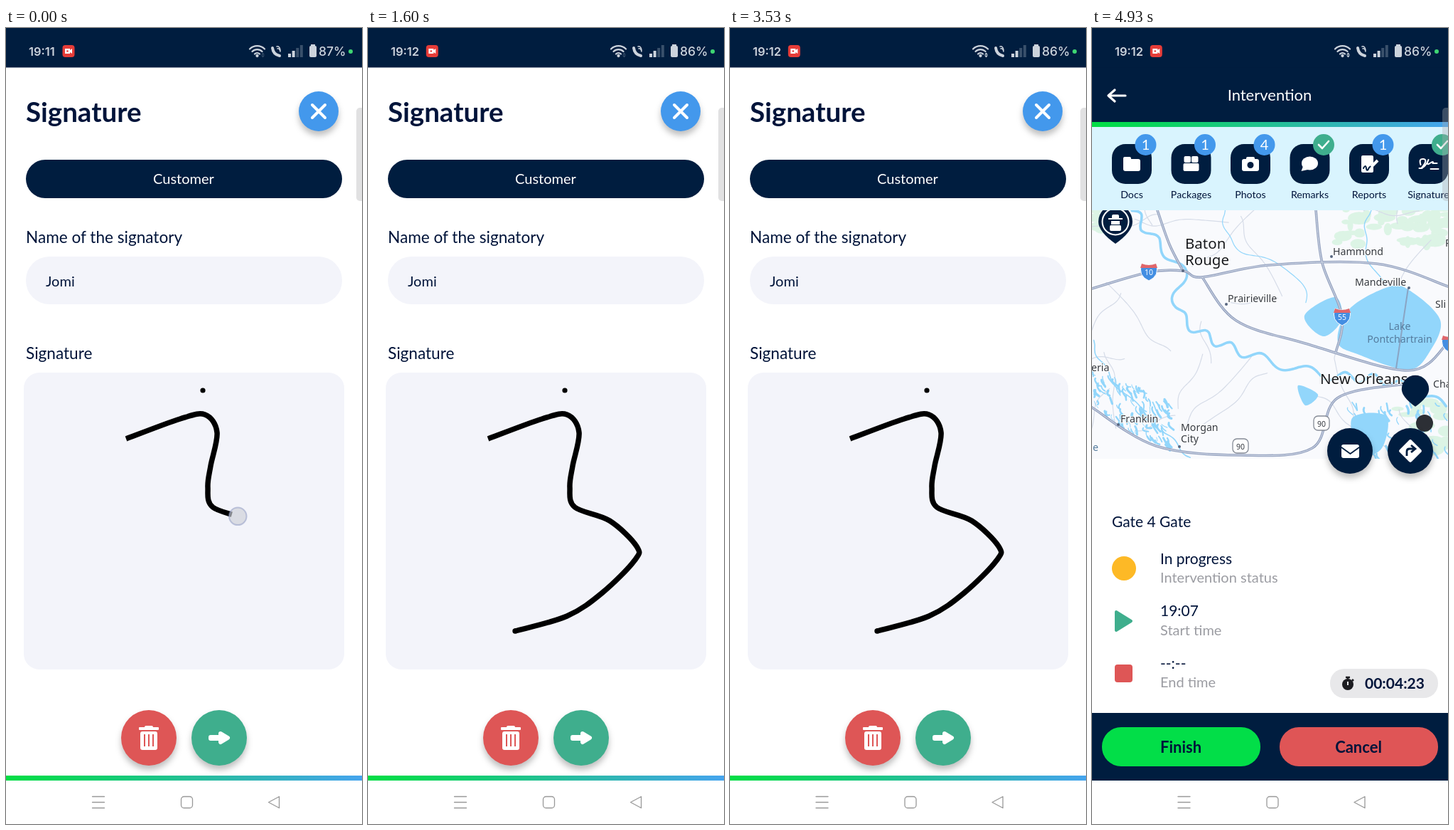
Write an HTML page that moves like this. It is 501 px wide and 1118 px high and loops after 5000 ms.

```html
<!DOCTYPE html>
<html lang="en">
<head>
<meta charset="utf-8">
<title>Sign-off flow</title>
<style>
html, body { margin: 0; width: 100%; height: 100%; overflow: hidden; background: #fff; }
svg { display: block; width: 100%; height: 100%; }
text { font: 20px Lato, "Open Sans", sans-serif; fill: #00143a; }
.mid, .tag, .count, .num, .sea { text-anchor: middle; }
.title { font-size: 38.5px; font-weight: 700; }
.label { font-size: 22.6px; }
.value { font-size: 21px; }
.head { font-size: 22px; }
.bold { font-size: 22px; font-weight: 700; }
.timer { font-size: 21px; font-weight: 700; }
.note { fill: #9b9ca2; }
.white { fill: #fff; }
.tag { font-size: 14.2px; }
.count { font-size: 20px; fill: #fff; }
.status text { font: 500 17.5px Inter, sans-serif; fill: #ccd3dc; }
.status #clock { font-size: 16.5px; font-weight: 600; }
.map text { font: 14.2px "Noto Sans", "Open Sans", sans-serif; fill: #34383f;
  paint-order: stroke; stroke: #fff; stroke-width: 2px; stroke-linejoin: round; }
.map .city { font-size: 20.5px; fill: #17191d; }
.map .sea { fill: #557c9e; stroke: none; }
.map .num { font-size: 10.5px; stroke: none; }
.line { fill: none; stroke-linecap: round; stroke-linejoin: round; }
.lift { filter: drop-shadow(0 6px 4px rgba(0, 0, 0, .25)); }
</style>
</head>
<body>
<svg viewBox="0 0 501 1118" preserveAspectRatio="none">
  <defs>
    <linearGradient id="brand"><stop stop-color="#02dd45"/><stop offset=".12" stop-color="#06d854"/><stop offset=".55" stop-color="#27bd9c"/><stop offset="1" stop-color="#45a4ee"/></linearGradient>
    <clipPath id="mapBox"><rect y="256" width="501" height="349"/></clipPath>
    <g id="interstate">
      <path d="M-10-11Q0-7 10-11Q16 6 0 13Q-16 6-10-11z" fill="#438ee2" stroke="#fff"/>
      <path d="M-10-11Q0-7 10-11L12-5H-12z" fill="#e0666b"/>
    </g>
    <rect id="route" x="-11" y="-10" width="22" height="20" rx="6" fill="#fff" stroke="#858b96" stroke-width="1.3"/>
    <path id="pin" d="M0 31Q-24 14-24 0A24 24 0 0 1 24 0Q24 14 0 31z" fill="#001d3f"/>
  </defs>
  <rect width="501" height="1118" fill="#fff"/>

  <g id="signScreen">
    <text x="28" y="132" class="title">Signature</text>
    <circle class="lift" cx="440" cy="117" r="28" fill="#4398ec"/>
    <path class="line" d="M431 108l18 18m0-18l-18 18" stroke="#fff" stroke-width="4"/>
    <rect x="28" y="185" width="445" height="54" rx="27" fill="#001d3f"/>
    <text x="250" y="219" class="mid white">Customer</text>
    <text x="28" y="302" class="label">Name of the signatory</text>
    <rect x="28" y="321" width="445" height="67" rx="33" fill="#f3f4fa"/>
    <text x="56" y="363">Jomi</text>
    <text x="28" y="465" class="label">Signature</text>
    <rect x="25" y="484" width="451" height="417" rx="22" fill="#f3f4fa"/>
    <circle cx="277" cy="509" r="3.6"/>
    <path id="ink" fill="none" stroke="#000" stroke-width="7.5"/>
    <circle id="inkEnd" cx="207" cy="847" r="3.7"/>
    <circle class="lift" cx="201" cy="997" r="39" fill="#de5656"/>
    <g fill="#fff">
      <rect x="195" y="980" width="12" height="4" rx="2"/>
      <rect x="187" y="982" width="28" height="4" rx="1"/>
      <rect x="189" y="988" width="24" height="26" rx="3"/>
      <path d="M195 992v17m6-17v17m6-17v17" stroke="#de5656" stroke-width="2"/>
    </g>
    <circle class="lift" cx="300" cy="997" r="39" fill="#3fae8d"/>
    <path d="M288 996h14v-5l10 6-10 6v-5h-14z" fill="#fff" stroke="#fff" stroke-width="6" stroke-linejoin="round"/>
    <rect y="1050" width="501" height="7" fill="url(#brand)"/>
  </g>

  <g id="jobScreen">
    <path d="M0 55H501V132H0zM0 962H501V1057H0z" fill="#001d3f"/>
    <path class="line" d="M47 95H23m9-8l-9 8 9 8" stroke="#fff" stroke-width="3.2"/>
    <text x="250" y="102" class="mid white head">Intervention</text>
    <rect y="132" width="501" height="7" fill="url(#brand)"/>
    <rect y="139" width="501" height="117" fill="#d9f4fe"/>
    <g id="tiles"></g>

    <g class="map" clip-path="url(#mapBox)">
      <rect y="256" width="501" height="349" fill="#f9fafd"/>
      <g id="woods" fill="#dcf4e5"></g>
      <g id="lanes" class="line" stroke="#d6dce8" stroke-width="1.2"></g>
      <g id="water" class="line" stroke="#92d6fb"></g>
      <g id="lakes" fill="#92d6fb"></g>
      <g id="roads" class="line"></g>
      <path d="M445 365L428 478" stroke="#8aa5c4" stroke-width="2"/>
      <g id="places"></g>
      <circle cx="468" cy="555" r="12" fill="#2c2f35"/>
      <use href="#pin" transform="translate(455 507) scale(.8)"/>
      <use href="#pin" x="33" y="272"/>
      <circle cx="33" cy="272" r="18.500" fill="none" stroke="#fff" stroke-width="2"/>
      <g fill="#fff">
        <rect x="28" y="262" width="10" height="7" rx="2"/>
        <rect x="23" y="267" width="20" height="2"/>
        <rect x="27" y="271" width="12" height="5"/>
        <rect x="25" y="277" width="16" height="8" rx="2"/>
      </g>
    </g>

    <g class="lift" fill="#001d3f"><circle cx="363" cy="594" r="32"/><circle cx="448" cy="594" r="32"/></g>
    <rect x="351" y="585" width="25" height="19" rx="3" fill="#fff"/>
    <path class="line" d="M351 589l12.500 9 12.500-9" stroke="#001d3f" stroke-width="1.800"/>
    <rect x="436" y="582" width="24" height="24" rx="3" fill="#fff" transform="rotate(45 448 594)"/>
    <path d="M443 601v-6q0-4 4-4h6m-4-5l6 5-6 5" fill="none" stroke="#001d3f" stroke-width="2.800"/>

    <text x="28" y="701" class="value">Gate 4 Gate</text>
    <circle cx="45" cy="759" r="17" fill="#fdb926"/>
    <path d="M34 820l21 13-21 13z" fill="#3fae8d" stroke="#3fae8d" stroke-width="4" stroke-linejoin="round"/>
    <rect x="32" y="894" width="25" height="25" rx="4" fill="#de5656"/>
    <g id="facts"></g>
    <rect x="335" y="900" width="152" height="41" rx="20" fill="#e8e8ea"/>
    <circle cx="360" cy="922" r="8" fill="#1c1c20"/>
    <path d="M357 912h6m-3 0v4m6-1l2 2" stroke="#1c1c20" stroke-width="2.600"/>
    <path d="M360 918v5" stroke="#e8e8ea" stroke-width="2"/>
    <text x="384" y="928" class="timer">00:04:23</text>
    <rect x="14" y="982" width="223" height="55" rx="27" fill="#02de48"/>
    <rect x="264" y="982" width="223" height="55" rx="27" fill="#df5556"/>
    <text x="125" y="1018" class="mid bold">Finish</text>
    <text x="375" y="1018" class="mid bold">Cancel</text>
  </g>

  <rect x="493" y="112" width="14" height="131" rx="5" fill="#a8a8ac" opacity=".35"/>
  <g class="status">
    <rect width="501" height="55.500" fill="#001d3f"/>
    <text id="clock" x="32" y="39"></text>
    <g id="rec">
      <rect x="79.500" y="24" width="17" height="17" rx="4" fill="#e63c38"/>
      <path d="M83 29h7v2l3-2v7l-3-2v2h-7z" fill="#fff"/>
      <circle cx="86.500" cy="32.500" r="1.300" fill="#e63c38"/>
    </g>
    <g id="signals" fill="#ccd3dc">
      <g id="waves" class="line" stroke="#ccd3dc" stroke-width="2.300"></g>
      <path id="up" d="M359 37.500h5l-2.500-3z"/>
      <path id="down" d="M359 38.500h5l-2.500 3z"/>
      <path class="line" d="M375 28Q376 37 385 39" stroke="#ccd3dc" stroke-width="4"/>
      <g id="bars"></g>
      <rect x="427" y="25" width="10" height="16" rx="2"/>
      <rect x="429" y="23" width="6" height="4"/>
      <text id="battery" x="440" y="39"></text>
    </g>
    <circle cx="485" cy="33" r="3" fill="#3ed673"/>
  </g>
  <g id="nav" class="line" stroke="#999" stroke-width="1.300">
    <path d="M121.500 1079.500h17m-17 8h17m-17 8h17M384.500 1079.500v16l-15-8z"/>
    <rect x="246.500" y="1079.500" width="16" height="16" rx="4"/>
  </g>
  <circle id="touch" r="12.300" fill="#cdd0d7" fill-opacity=".65" stroke="#929dc4" stroke-opacity=".55" stroke-width="2"/>
</svg>
<script>
const el = id => document.getElementById(id);
const fill = (id, parts) => el(id).innerHTML = parts.join("");
const show = (id, on) => el(id).style.display = on ? "" : "none";
const range = (n, make) => Array.from({ length: n }, (_, i) => make(i));

let seed = 7;
const rand = (lo, hi) => lo + (hi - lo) * ((seed = seed * 16807 % 2147483647) / 2147483647);

// Smooth curve through "x,y x,y ..." (Catmull-Rom as cubic segments).
function curve(via, closed) {
  const p = via.split(" ").map(s => s.split(",").map(Number)), n = p.length;
  const at = i => closed ? p[(i + n) % n] : p[Math.max(0, Math.min(n - 1, i))];
  return "M" + p[0] + range(closed ? n : n - 1, i => {
    const a = at(i - 1), b = at(i), c = at(i + 1), e = at(i + 2);
    return `C${b.map((v, k) => v + (c[k] - a[k]) / 6)} ${c.map((v, k) => v - (e[k] - b[k]) / 6)} ${c}`;
  }).join("");
}

// The same curve, swinging from side to side like a river.
function meander(via, swing, bend) {
  const path = document.createElementNS("http://www.w3.org/2000/svg", "path");
  path.setAttribute("d", curve(via));
  const length = path.getTotalLength(), phase = rand(0, 6);
  return curve(range(Math.ceil(length / 6), i => {
    const s = i * 6, p = path.getPointAtLength(s), q = path.getPointAtLength(s + 1);
    const side = swing * Math.sin(s / bend + phase + 1.5 * Math.sin(s / 37));
    return `${p.x - (q.y - p.y) * side},${p.y + (q.x - p.x) * side}`;
  }).join(" "));
}

const stroke = (d, width, more = "") => `<path d="${d}" stroke-width="${width}" ${more}/>`;

fill("waves", range(3, i => {
  const r = 5 + 5 * i, h = r * .7;
  return `<path d="M${353.5 - h} ${40 - h}A${r} ${r} 0 0 1 ${353.5 + h} ${40 - h}"/>`;
}).concat(`<circle cx="353.5" cy="39" r="1"/>`,
  range(2, i => `<path d="M${382 - i} ${29 - 3 * i}q${3 + i}-1 ${4 + i} ${4 + i}" stroke-width="1.5"/>`)));
fill("bars", range(4, i => `<rect x="${397 + 5.6 * i}" y="${36 - 4 * i}" width="4" height="${5 + 4 * i}" opacity="${i < 2 ? 1 : .28}"/>`));

const dark = "#001d3f";
const disc = (colour, inner) => `<circle r="15" fill="${colour}"/>${inner}`;
const count = n => disc("#4398ec", `<text class="count" y="7">${n}</text>`);
const done = disc("#3fae8d", `<path class="line" d="M-7 0l5 5 9-10" stroke="#fff" stroke-width="2.6"/>`);
const due = `<g id="due">${disc("#fdb926", `<text class="count" y="7">!</text>`)}</g>`;
const box = (x, y, w, h, rx = 2) => `<rect x="${x}" y="${y}" width="${w}" height="${h}" rx="${rx}"/>`;
const tiles = [
  ["Docs", count(1), box(-12, -10, 11, 12) + box(-12, -7, 24, 17, 3)],
  ["Packages", count(1), box(-10, -11, 9.5, 9) + box(.5, -11, 9.5, 9) + box(-11, -1, 22, 11)],
  ["Photos", count(4), box(-6, -10, 12, 6) + box(-12, -7, 24, 17, 3) + `<circle r="4.5" cy="1.5" fill="${dark}"/>`],
  ["Remarks", done, `<ellipse rx="11.5" ry="9.5" cy="-1"/><path d="M-9 2l-3 8 9-2z"/>`],
  ["Reports", count(1), box(-11, -12, 17, 24) + `<path class="line" d="M-8 6q3-6 4 0t4-1L11-4" stroke="${dark}" stroke-width="2"/><path d="M3 4l9-9" stroke="#fff" stroke-width="4"/>`],
  ["Signature", done + due, `<path class="line" d="M-13 6h4M-11 1q-3-9 4-8t-3 13q6-2 10-12-4 9 2 5t4 0h6M3 7h11" stroke="#fff" stroke-width="2"/>`]
];
fill("tiles", tiles.map(([name, badge, icon], i) => `<g transform="translate(${56 + i * 83.5} 191)">
  <rect x="-28" y="-28" width="56" height="56" rx="19" fill="${dark}"/><g fill="#fff">${icon}</g>
  <text class="tag" y="48">${name}</text><g transform="translate(19.5 -27)">${badge}</g></g>`));

fill("facts", [["In progress", "Intervention status"], ["19:07", "Start time"], ["--:--", "End time"]]
  .map(([value, name], i) => `<text x="96" y="${752.5 + i * 73.7}" class="value">${value}</text>
    <text x="96" y="${779 + i * 73.7}" class="note">${name}</text>`));

// Map: scattered woods, country lanes, winding water, main roads.
const wood = (x0, x1, y0, y1) =>
  `<ellipse cx="${rand(x0, x1)}" cy="${rand(y0, y1)}" rx="${rand(4, 16)}" ry="${rand(3, 9)}"/>`;
fill("woods", [
  ...range(60, () => wood(345, 501, 250, 305)),
  ...range(8, () => wood(0, 16, 250, 290)),
  ...range(18, () => wood(430, 501, 525, 600))
]);

fill("lanes", range(22, () => {
  const x = rand(0, 480), y = rand(256, 580), turn = rand(0, 6.3), reach = rand(60, 150);
  return stroke(meander(`${x},${y} ${x + reach * Math.cos(turn)},${y + reach * Math.sin(turn)}`, 5, 17), 1.2);
}));

const marsh = (x0, x1, y0, y1, slope) => {
  const x = rand(x0, x1), y = rand(y0, y1) + (x - x0) * slope;
  return stroke(`M${x} ${y}q${rand(-4, 4)} ${rand(2, 6)} ${rand(0, 8)} ${rand(4, 12)}`, rand(.8, 3.6));
};
fill("water", [
  stroke(meander("57,256 90,300 126,342 120,395 165,435 250,468 335,488 420,497 501,534", 7, 8), 3.6),
  stroke(meander("185,256 200,305 285,345 302,390", 3, 9), 1.2),
  stroke(meander("0,440 34,500 140,605", 3, 9), 1.6),
  stroke(meander("390,256 385,310 412,365", 3, 9), 1.4),
  ...range(110, () => marsh(0, 110, 475, 540, .45)),
  ...range(50, () => marsh(355, 500, 525, 600, 0))
]);

const lakes = [
  "346,441 362,395 416,364 446,368 490,410 475,455 445,480 376,459",
  "299,404 342,378 351,410 325,433",
  "290,502 318,515 300,530",
  "366,548 414,545 408,590 378,598"
];
fill("lakes", lakes.map(via => `<path d="${curve(via, true)}"/>`));

const roads = [
  "0,366 80,343 128,341 155,350 250,333 400,331 501,363",
  "155,350 203,411 300,443 445,481 501,442",
  "315,256 324,330 352,405 343,456",
  "92,256 109,304 128,341",
  "0,533 90,587 209,600 310,590 345,520 440,500"
].map(via => curve(via));
fill("roads", roads.map(d => stroke(d, 3.6, `stroke="#98a5c1"`)).concat(roads.map(d => stroke(d, 1, `stroke="#d5dcea"`))));

const name = (text, x, y, style = "") => `<text class="${style}" x="${x}" y="${y}">${text}</text>`;
const dot = (x, y) => `<circle cx="${x}" cy="${y}" r="2" fill="#596780"/>`;
const sign = (kind, x, y, n, style) => `<use href="#${kind}" x="${x}" y="${y}"/>` + name(n, x, y + 5, "num " + style);
const shield = (x, y, n) => sign("interstate", x, y, n, "").replace("<text", `<text style="fill:#fff"`);
fill("places", [
  shield(80, 342, 10), shield(352, 405, 55), shield(504, 443, ""),
  sign("route", 323, 555, 90), sign("route", 209, 587, 90),
  dot(128, 341), dot(337, 321), dot(189, 388), dot(446, 365), dot(37, 557), dot(123, 588),
  name("Baton", 131, 310, "city"), name("Rouge", 131, 333, "city"), name("New Orleans", 321, 500, "city"),
  name("Hammond", 339, 319), name("Prairieville", 191, 385), name("Mandeville", 370, 362),
  name("Franklin", 40, 554), name("Morgan", 125, 566), name("City", 125, 582),
  name("eria", -1, 482), name("Sli", 483, 393), name("Cha", 480, 505), name("P", 497, 307),
  name("Lake", 433, 424, "sea"), name("Pontchartrain", 433, 442, "sea"), name("e", 5, 594, "sea")
]);

const ink = el("ink");
ink.setAttribute("d", curve("169,577 245,549 280,543 297,568 288,615 284,645 291,673 340,692 378,728 375,748 330,793 280,826 207,847"));
const total = ink.getTotalLength();

function draw(t) {
  const k = Math.floor((t + 4) * .015); // 15 steps per second
  const job = k >= 69, drawn = k >= 9;
  show("signScreen", !job);
  show("jobScreen", job);
  show("due", k < 72);

  const reach = drawn ? total : Math.min(total, 295 + 33.5 * k);
  ink.setAttribute("stroke-dasharray", `${drawn ? total : reach - 9} ${total + 9}`);
  show("inkEnd", drawn);

  const tap = k >= 67;
  const spot = tap ? { x: 305.5, y: 994 } : ink.getPointAtLength(reach);
  const alpha = tap ? (k < 71 ? 1 : 0) : Math.max(0, Math.min(1, (13 - k) / 3));
  el("touch").setAttribute("transform", `translate(${spot.x} ${spot.y})`);
  el("touch").setAttribute("opacity", alpha);

  el("clock").textContent = k < 24 ? "19:11" : "19:12";
  el("rec").setAttribute("transform", `translate(${k < 24 ? 0 : 2.3})`);
  el("battery").textContent = k < 10 ? "87%" : "86%";
  el("signals").setAttribute("transform", `translate(${k < 10 ? 0 : -1})`);
  el("up").setAttribute("opacity", k < 32 ? .25 : 1);
  el("down").setAttribute("opacity", k < 42 ? .25 : 1);
  el("nav").setAttribute("transform", `translate(${k < 28 ? 0 : -.5})`);
}

const start = performance.now();
function tick() {
  draw((performance.now() - start) % 5000);
  requestAnimationFrame(tick);
}
tick();
</script>
</body>
</html>
```
